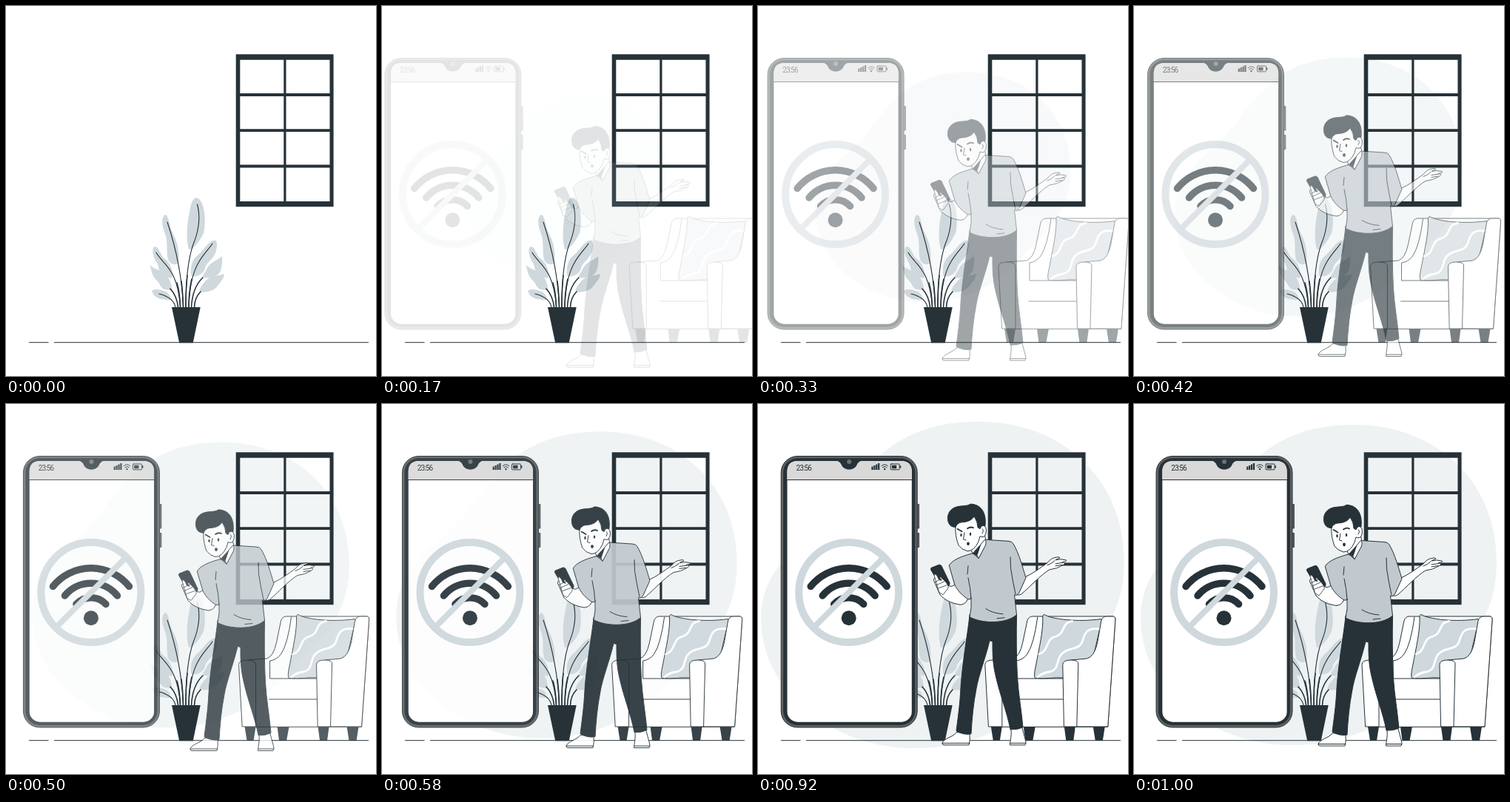
An HTML page for the animation above (1.04 s loop, 500 px wide and 500 px high).

```html
<!DOCTYPE html>
<html lang="en">
<head>
<meta charset="utf-8">
<title>No connection</title>
<style>
  html, body { margin: 0; width: 100%; height: 100%; overflow: hidden; background: #fff; }
  svg { display: block; width: 100%; height: 100%; fill: none; stroke: #263238; stroke-linecap: round; stroke-linejoin: round; }
  .dark { fill: #263238; }
  .white { fill: #fff; }
  .pale { fill: #cfd8dc; }
  .wool { fill: #c1c9ce; }
  .flat { stroke: none; }
  text { font: 10px Roboto, Arial, sans-serif; letter-spacing: -.9px; }
</style>
</head>
<body>
<svg viewBox="0 0 500 500">
  <g id="blob">
    <path class="flat" fill="#eef2f3" d="M297 28C409 28 490 105 490 213C490 300 440 330 400 375C350 432 290 461 212 461C110 461 9 390 9 289C9 215 70 190 110 140C150 85 190 28 297 28Z"/>
  </g>

  <g id="window">
    <path class="dark flat" fill-rule="evenodd" d="M310.7 65.3H442.6V271.3H310.7Z
      M316.300 72.800H375.300V118H316.300Z M378.500 72.800H437.500V118H378.500Z
      M316.300 121.900H375.300V166.200H316.300Z M378.500 121.900H437.500V166.200H378.500Z
      M316.300 170.100H375.300V214.500H316.300Z M378.500 170.100H437.500V214.500H378.500Z
      M316.300 218.400H375.300V264H316.300Z M378.500 218.400H437.500V264H378.500Z"/>
  </g>

  <path stroke-linecap="butt" d="M31 454.7H57.5M65 454.7H490"/>

  <g id="plant">
    <g class="pale flat">
      <path d="M257 259C249 261 249 277 246 289C244 304 244 318 247 329C253 329 262 318 267 307C271 293 269 261 257 259Z"/>
      <path d="M215 282C209 286 211 298 215 308C220 320 215 338 221 346C224 350 232 350 233 347C235 336 232 319 226 308C221 299 220 282 215 282Z"/>
      <path d="M201 325C196 327 199 340 204 347C208 355 205 361 214 364C219 366 223 370 225 366C226 356 221 346 214 341C208 336 207 325 201 325Z"/>
      <path d="M194 350C197 355 196 364 203 370C209 375 208 383 218 383.500Q224 385 224 381C223 371 218 363 211 359C204 356 199 354 194 350Z"/>
      <path d="M197 385C202 381 211 384 216 386C222 389 222 394 223 397C213 397 201 397 197 385Z"/>
      <path d="M284 317C275 315 269 328 261 335C252 342 249 349 250 364C256 368 268 362 269 354C270 347 281 342 284 331Q286 321 284 317Z"/>
      <path d="M292 338C286 344 276 346 272 354C269 361 264 364 267 367C276 369 286 366 290 358Q293 348 292 338Z"/>
      <path d="M295 362C286 365 275 365 269 372C264 378 261 382 262 386C271 388 281 385 286 378C291 371 294 369 295 362Z"/>
    </g>
    <path stroke-width="1.1" d="M258.500 268C263 285 260 305 253 322C246 342 243 370 243 407
      M218 292C228 322 238 365 239.500 407 M203 333C211 349 232 353 235.500 407
      M207 389C219 392 227 397 229 407 M279 321C268 338 249 346 247 407"/>
    <path stroke-width="1.6" d="M232.500 407Q231 392 222 382M250.500 407Q252 380 266 367M254.500 407Q255 394 263 386
      M235.500 407Q235 388 231 374M239.500 407Q239 388 237 372M243 407Q243 380 245 364M247 407Q247 386 251 369"/>
    <path class="dark flat" d="M224 407H262.700L252.700 455.200H234.200Z"/>
  </g>

  <g id="phone">
    <path fill="#616161" stroke-width=".8" d="M213 135.500H216.400V168H213ZM213 174.500H216.400V193.500H213Z"/>
    <rect x="30" y="70.500" width="184" height="366.500" rx="22" fill="#616161"/>
    <rect class="dark flat" x="33" y="73.300" width="178" height="360.700" rx="19"/>
    <rect class="white flat" x="38.300" y="77" width="168.300" height="352.700" rx="14"/>
    <path class="flat" fill="#d9d9d9" d="M38.300 102.500V91Q38.300 77 52.300 77H192.600Q206.600 77 206.600 91V102.500Z"/>
    <path d="M38 102.500H207"/>
    <path class="dark flat" d="M105 76.500H139Q134 78 132.500 82C131 86 127 88.500 122 88.500S113 86 111.500 82Q110 78 105 76.500Z"/>
    <circle class="flat" cx="122" cy="78" r="3" fill="#6b7072"/>
    <text class="dark flat" x="50.300" y="89.500">23:56</text>
    <path stroke-width="2.200" stroke-linecap="butt" d="M153.300 89V84.500M156.200 89V83M159.100 89V81.500M162 89V80"/>
    <path d="M165.700 83.700Q170 79.700 174.300 83.700M167.200 85.700Q170 83 172.800 85.700"/>
    <circle class="dark flat" cx="170" cy="88" r="1.200"/>
    <rect x="178" y="81" width="12" height="7.800" rx="1"/>
    <path class="dark flat" d="M179.700 82.700H186V87.200H179.700ZM190.500 83.300H192V86.500H190.500Z"/>
    <path stroke-width="9.500" d="M70 246.500A66 66 0 0 1 173 246.500M86 259A46 46 0 0 1 157 259M101.500 270.500A27 27 0 0 1 141.500 270.500"/>
    <circle class="dark flat" cx="121.500" cy="289.300" r="10"/>
    <g stroke="#cfd8dc" stroke-width="10">
      <circle cx="121.500" cy="254.500" r="67.500"/>
      <path stroke-width="8" stroke-linecap="butt" d="M169.500 206.500L73.500 302.500"/>
    </g>
  </g>

  <g id="sofa">
    <path class="dark flat" d="M316 436H331L328 455H319ZM360 436H376L372.500 455H362.500ZM415 436H430L427.500 455H417.500ZM454 436H470L467 455H457Z"/>
    <path class="white" d="M319 436V346L346 344Q355 341 359 322L365 293Q367 287 372 287H482Q485 288 484 293L474 436Z"/>
    <path d="M379 288Q374 325 365 338Q359 346 350 347V371H414M349 399H414"/>
    <path class="pale" d="M388 284.500C398 291 434 295 465 290.500Q467 293 463 304L452 352L414 370C402 369 390 372 376 370.500Q373 369 377 352C381 330 387 306 386 287Z"/>
    <path stroke="#fff" stroke-width="2.800" d="M426 293.500C411 295 417 310 404 314C389 317 395 334 381 338M463 304C446 302 443 309 440 319C437 332 424 329 415 335C402 343 411 358 395 362Q386 363 379 369"/>
    <path class="white" d="M424 346L446 344Q456 341 460 322L465 293Q467 287 472 287H482Q485 288 484 293L474 436H430Z"/>
    <path class="white" d="M413 352Q413 346 424 346Q435 346 434 352L432 436H415ZM308 352Q308 346 319 346Q331 346 331 352V436H313Z"/>
  </g>

  <g id="person">
    <g class="white">
      <path d="M268 445C265 451 250 453 249 460Q249 462 252 462H285Q287 456 286 447Z"/>
      <path d="M342 441C343 449 341 454 340.500 462H361Q363 459 361 454L357 439Z"/>
      <path d="M249 459.500H286M341 459.500H362"/>
    </g>
    <path class="dark" d="M286 286C284 309 277 343 274 384C273 407 270 427 268 443Q278 449 288 447C289 428 291 406 295 386C298 368 307 346 313 321L317 322C317 340 317 352 322 372C327 394 336 416 341 441Q350 442 358 438C356 415 352 394 350.500 370C349 342 349 312 349.500 286Z"/>

    <path class="white" d="M361 235C372 230 381 223 391 216Q396 209 403 208.500Q407 207 408 209L402 212Q409 210 416 212Q419 213.500 411 215Q418 215 412 219Q404 224 394 225C382 232 368 248 356 258Q351 261 347 257Z"/>
    <path d="M391 219Q397 217 401 213M402 217L412 215.500M402 220L411 218.500"/>

    <path class="white" d="M265 246Q262 249 258 247L253 241L239 236Q236 238 239 243L246 259C253 267 263 271 274 272.500Q284 271 284 260Z"/>
    <path class="dark" d="M234.500 222.500L244.500 218.500Q247 218 248 220L259 243Q259.500 246 257 247L250 250Q248 250 247 248L233.500 225Q233 223 234.500 222.500Z"/>
    <path class="white" stroke-width=".8" d="M239 236C236 228 242 231 244 238L248 240Q244 234 247 235L253 241Q258 247 257 250L250 259L245 256Z"/>
    <path stroke-width=".8" d="M239 242L249 237M241 246L252 241M244 250L255 246"/>

    <path class="white" d="M287 195L291 206L298 209L308 186L305 172Z"/>
    <path class="wool" d="M290 203C279 206 266 210 260 217Q257 219 259 222L266 246C270 254 277 261 284 265Q288 266 288 263Q289 277 286 289C302 298 335 299 349.500 286L346.500 259Q350 261 353 256L362 236C357 220 353 204 345 190Q343 186.500 338 186.500L307 184.500Q304 199 298 209Z"/>
    <path class="dark" stroke-width=".6" d="M290 203L301 191L297 207Z"/>
    <path class="white" d="M301 191L306.500 184.500Q309 186 307.500 192L298 210L296 206Z"/>
    <path d="M284 236Q287 249 288 264M341 208L341.500 223Q344 240 348 258M308 278Q317 284 331 285M323 291L333 290M284 220L283 231"/>

    <path class="white" d="M267 164C266 174 268 184 271 192Q275 198 283 200Q292 200 298 187L300 180Q306 183 308 176Q310 166 303 165L298 151L275 150Z"/>
    <path class="dark" d="M267 167.500C261 168 257 164 256.500 157C256 150 259 145 264 142C270 138.500 277 139.500 284 138Q287 135 292 137C302 139 309 149 307 166Q302 164 300 170L297 168Q297 160 292 153C289 159 281 161 275 161Q269 162 267 167.500Z"/>
    <path d="M279 175L277.500 184L281 185M303 170Q306 171 303 176"/>
    <path stroke-width="1.800" d="M269.500 170L275.500 173.500M283 169.500Q287 166.500 291 168.500"/>
    <g class="dark flat">
      <ellipse cx="274.500" cy="178.300" rx="1.200" ry="2.200"/>
      <ellipse cx="287" cy="177" rx="1.200" ry="2.200"/>
      <ellipse cx="284" cy="190" rx="1.900" ry="2.400"/>
    </g>
  </g>
</svg>
<script>
  const LOOP = 1040, FPS = 24, LEAD = 0.02;
  const [blob, phone, sofa, person] = ['blob', 'phone', 'sofa', 'person'].map(id => document.getElementById(id));

  const bezier = (a, b, s) => 3 * a * s * (1 - s) ** 2 + 3 * b * s * s * (1 - s) + s ** 3;

  // cubic-bezier(.36, -.01, .5, 1.38): settles after a small overshoot
  function ease(t) {
    if (t >= 1) return 1;
    let lo = 0, hi = 1;
    for (let i = 0; i < 24; i++) {
      const mid = (lo + hi) / 2;
      if (bezier(.36, .5, mid) < t) lo = mid; else hi = mid;
    }
    return bezier(-.01, 1.38, lo);
  }

  function draw(ms) {
    const step = Math.floor((ms + 5) * FPS / 1000);
    const e = step < 2 ? 0 : ease(step / FPS + LEAD);
    const gap = 30 * (1 - e);
    const place = (part, transform) => {
      part.setAttribute('transform', transform);
      part.setAttribute('opacity', Math.max(0, Math.min(1, e)));
    };
    place(blob, `translate(250 244.5) scale(${.5 + e / 2}) translate(-250 -244.5)`);
    place(phone, `translate(${-gap} 0)`);
    place(sofa, `translate(${gap} 0)`);
    place(person, `translate(0 ${gap})`);
  }

  const start = performance.now();
  function tick() {
    draw((performance.now() - start) % LOOP);
    requestAnimationFrame(tick);
  }
  tick();
</script>
</body>
</html>
```
